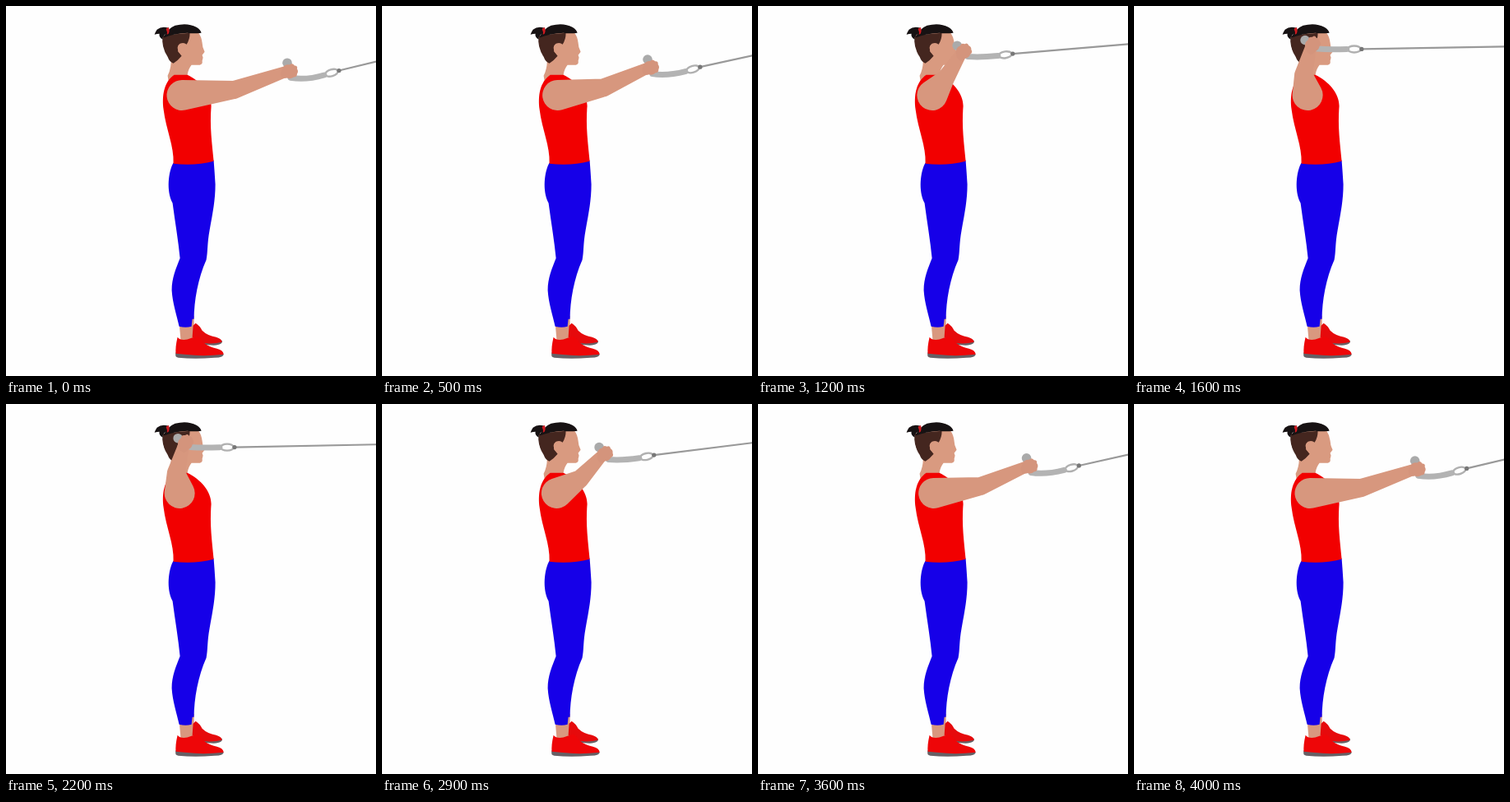
Write an HTML page that moves like this. It is 450x450 px and loops after 4.1 s.

```html
<!DOCTYPE html>
<html lang="en">
<head>
<meta charset="utf-8">
<title>Face pull</title>
<style>
  html, body { margin: 0; width: 100%; height: 100%; overflow: hidden; background: #fefefe; }
  svg { display: block; width: 100vw; height: 100vh; }
</style>
</head>
<body>
<svg viewBox="0 0 450 450">
  <g transform="translate(-.4 .8)">
    <!-- far shoe and ankles -->
    <path fill="#d9987f" d="M211 384L229 376L229 390L227 407L213 407Z"/>
    <path fill="#666065" d="M240 407L263 406Q265 411 253 412L240 411Z"/>
    <path fill="#e60a0c" d="M228 388L231 385Q236 388 239 394Q245 400 256 402Q263 404 263 408Q252 411 240 409L227 402Z"/>
    <!-- near shoe -->
    <path fill="#666065" d="M207 420L265 422Q266 427 254 427Q230 429 210 427Q205 426 207 420Z"/>
    <path fill="#ee0608" d="M209 402Q214 408 226 403L232 401Q237 402 240 408Q247 414 257 416Q265 418 265 423Q245 425 230 424Q217 423 207 422Q206 415 209 402Z"/>
    <!-- legs -->
    <path fill="#1600e8" d="M204 190C198 200 195 224 203 239C206 262 210 285 212 306C207 319 202 330 202 345C203 361 208 375 211 389Q219 391 226 389L227 380L229 380C229 358 234 330 244 308C246 298 245 288 248 272C252 250 255 235 255 216Q254 200 253 187Z"/>
    <!-- neck and face -->
    <path fill="#d99a80" d="M201 62Q202 74 197 84L199 96L226 96L221 83Q222 76 226 71L236 71Q240 70 239 66L240 62L239 59L242 55Q239 49 239 44Q238 36 234 31L206 31Z"/>
    <!-- shirt -->
    <path fill="#f20000" d="M205 83L221 83C237 91 250 105 250 121C248 146 251 166 253 188Q230 194 204 191C205 169 195 150 192 125C190 109 192 92 205 83Z"/>
    <!-- hair -->
    <path fill="#44261f" d="M191 35L224 32Q224 40 220 46Q217 43 212 45Q208 48 210 55L214 60Q210 65 204 69Q199 67 197 61Q189 49 191 35Z"/>
    <path fill="#d99a80" d="M209 50Q210 44 215 46Q218 49 216 54Q213 58 210 55Z"/>
    <path fill="#171213" d="M192 38Q196 27 206 23Q221 19 232 25Q237 28 238 32Q228 33 221 32Q203 33 192 38Z"/>
    <path fill="#171213" d="M198 26Q190 23 184 28Q182 31 181 34Q184 33 187 33Q186 37 191 40Q190 35 197 32Z"/>
    <path fill="#cf1a20" d="M195 27L198 25Q200 29 198 33L196 34Q197 31 195 27Z"/>
  </g>
  <path id="cable" fill="none" stroke="#999" stroke-width="2.2"/>
  <ellipse id="ring" rx="8" ry="4" fill="none" stroke="#b0b0b0" stroke-width="2.4"/>
  <circle id="ball" r="2.6" fill="#777"/>
  <path id="grip" fill="none" stroke="#b3b3b3" stroke-width="7" stroke-linecap="round" stroke-linejoin="round"/>
  <circle id="knob" r="5.8" fill="#aaa"/>
  <path id="arm" fill="#d7977e"/>
  <path id="fist" fill="#d4947c" d="M-10 3L-7 -4Q-4 -8 1 -7Q4 -10 7 -6Q11 -6 10 -2Q12 1 10 4Q10 8 6 8Q2 11 -2 9Q-6 10 -9 8Z"/>
</svg>
<script>
const LOOP = 4100, STEP = 100;
const set = (id, name, value) => document.getElementById(id).setAttribute(name, value);
const place = (id, [x, y], turn = 0) => set(id, 'transform', `translate(${x} ${y}) rotate(${turn})`);
const add = ([x, y], dx, dy) => [x + dx, y + dy];
const polar = ([x, y], r, a) => [x + r * Math.cos(a), y + r * Math.sin(a)];
const angle = (a, b) => Math.atan2(b[1] - a[1], b[0] - a[0]);

// Outline of two circles joined by their outer tangents
function limb(a, ra, b, rb) {
  const dir = angle(a, b);
  const open = Math.acos((ra - rb) / Math.hypot(b[0] - a[0], b[1] - a[1]));
  return `M${polar(a, ra, dir - open)}L${polar(b, rb, dir - open)}` +
    `A${rb} ${rb} 0 0 1 ${polar(b, rb, dir + open)}` +
    `L${polar(a, ra, dir + open)}A${ra} ${ra} 0 1 1 ${polar(a, ra, dir - open)}Z`;
}

// 0 with the arms stretched, 1 with the hands at the head
const ease = x => (1 - Math.cos(Math.PI * Math.min(1, Math.max(0, x)))) / 2;
const pull = t => t < 1850 ? ease((t - 80) / 1755) : 1 - ease((t - 1880) / 2190);

function draw(t) {
  const u = pull(t);
  const shoulder = [214 - 3 * u, 108.5];
  const elbow = [277 - 55 * u - 20 * u * u, 102 - 19 * u];
  const hand = [344 - 134 * u, 78.5 - 33 * u];
  const turn = -45 * u;

  const axis = (turn - 102) * Math.PI / 180;
  const knob = polar(hand, 9.5, axis);
  const heel = polar(hand, -9, axis);
  const bend = add(hand, 21, 12 - 6 * u);
  const tip = add(hand, 43, 5.5);
  const ball = add(hand, 61, 6 * u * u);
  const slope = 0.235 * u ** 1.2 - 0.24;

  set('arm', 'd', limb(shoulder, 18.5, elbow, 11) + limb(elbow, 11, hand, 6.5));
  set('grip', 'd', `M${knob}L${heel}Q${bend} ${tip}`);
  set('cable', 'd', `M${ball}L451 ${ball[1] + slope * (451 - ball[0])}`);
  place('ring', [(tip[0] + ball[0]) / 2, (tip[1] + ball[1]) / 2], angle(tip, ball) * 180 / Math.PI);
  place('ball', ball);
  place('knob', knob);
  place('fist', hand, turn);
}

const start = performance.now();
function tick() {
  const t = (performance.now() - start) % LOOP;
  draw(Math.floor(t / STEP) * STEP);
  requestAnimationFrame(tick);
}
tick();
</script>
</body>
</html>
```
